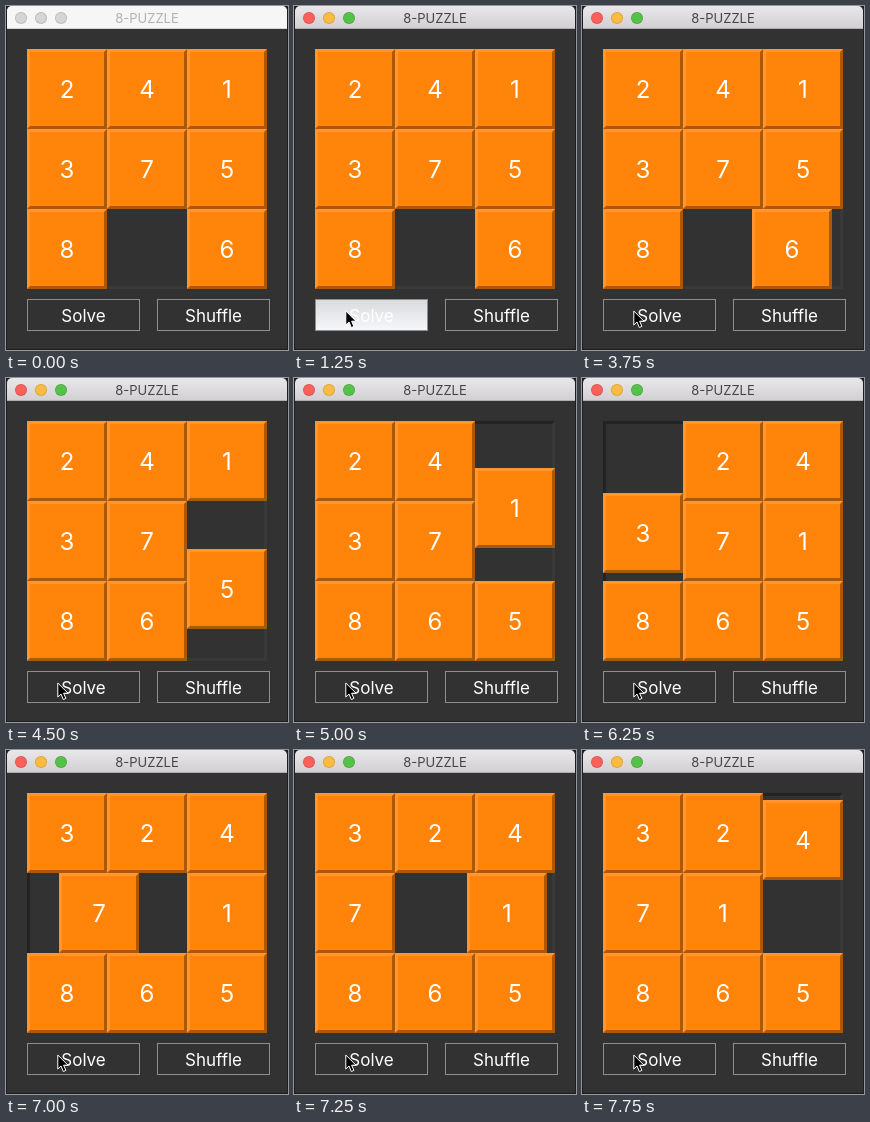
Write an HTML page that moves like this. It is 282 by 344 pixels and loops after 8000 ms.

```html
<!DOCTYPE html>
<html lang="en">
<head>
<meta charset="utf-8">
<title>8-PUZZLE</title>
<style>
  html, body { margin: 0; width: 100%; height: 100%; overflow: hidden; background: #1e1e1e; }
  body { font-family: Inter, "Liberation Sans", sans-serif; color: #fff; }
  div { position: absolute; box-sizing: border-box; }
  #stage { left: 0; top: 0; width: 282px; height: 344px; overflow: hidden; }
  #window { left: 1px; top: 0; width: 280px; height: 343px; background: #323232; border-radius: 5px 5px 0 0; overflow: hidden; }
  .bar { left: 0; top: 0; width: 280px; height: 23px; font-size: 13px; line-height: 25px; text-align: center; }
  .bar.active { background: linear-gradient(#e9e7e9, #d2d0d2); border-bottom: 1px solid #b0aeb0; color: #464446; }
  .bar.idle { background: #f6f6f6; border-bottom: 1px solid #d4d4d4; color: #b2b2b2; }
  .light { top: 6px; width: 12px; height: 12px; border-radius: 50%; border: 0.5px solid rgba(0, 0, 0, .12); }
  #board { left: 21px; top: 43px; width: 240px; height: 240px; }
  #frame { inset: 0; border: 3px solid; border-color: #232323 #393939 #393939 #232323; }
  .tile { width: 80px; height: 80px; background: #ff8409; border: 3px solid;
    border-color: #ff9630 #ab5807 #ab5807 #ff9630;
    font-size: 24px; line-height: 75px; text-align: center; }
  .button { top: 293px; width: 113px; height: 32px; border: 1px solid #8f8f91; font-size: 17px; line-height: 32px; text-align: center; }
  #pressed { inset: 0; background: linear-gradient(#dadbde, #f6f7fa); }
  .button span { position: relative; }
  #cursor { position: absolute; left: 0; top: 0; }
</style>
</head>
<body>
<div id="stage">
  <div id="window">
    <div class="bar active">8-PUZZLE</div>
    <div class="bar idle" id="idle">8-PUZZLE</div>
  </div>
  <div id="board"><div id="frame"></div></div>
  <div class="button" style="left:21px"><div id="pressed"></div><span>Solve</span></div>
  <div class="button" style="left:151px"><span>Shuffle</span></div>
  <svg id="cursor" width="13" height="20">
    <path d="M.8 1V15L4 12L6.3 17.5L8.9 16.4L6.6 11.2H11Z" fill="#000" stroke="#fff"/>
  </svg>
</div>
<script>
  const LOOP = 8000, TICK = 250, CELL = 80;
  const $ = id => document.getElementById(id);

  function add(parent, cls, text = '') {
    const el = document.createElement('div');
    el.className = cls;
    el.textContent = text;
    parent.append(el);
    return el;
  }

  // steps: [ms, value]; each value holds until the next one
  function play(el, prop, steps) {
    const last = steps[steps.length - 1][1];
    const keys = [...steps, [LOOP, last]].map(([ms, value]) =>
      ({ offset: ms / LOOP, [prop]: value, easing: 'step-end' }));
    el.animate(keys, { duration: LOOP, iterations: Infinity });
  }

  const at = (x, y) => `translate(${x}px, ${y}px)`;

  // Window buttons
  const paint = (bar, colors) => colors.forEach((color, i) => {
    const light = add(bar, 'light');
    light.style.left = 8 + 20 * i + 'px';
    light.style.background = color;
  });
  paint(document.querySelector('.active'), ['#fc605b', '#fdbc40', '#57c24a']);
  paint($('idle'), Array(3).fill('#d6d6d6'));

  // Tiles
  const tiles = {};
  [...'2413758 6'].forEach((n, i) => {
    if (n === ' ') return;
    const x = i % 3 * CELL, y = Math.floor(i / 3) * CELL;
    tiles[n] = { el: add($('board'), 'tile', n), x, y, steps: [[0, at(x, y)]] };
  });

  // tile, direction, distance covered at the first and second tick
  const moves = [
    [6, -1, 0, 11, 49], [5, 0, 1, 7, 48], [1, 0, 1, 7, 47],
    [4, 1, 0, 8, 47], [2, 1, 0, 7, 48], [3, 0, -1, 8, 49],
    [7, -1, 0, 8, 48], [1, -1, 0, 8, 48], [4, 0, 1, 7, 48]
  ];
  moves.forEach(([n, dx, dy, ...dist], i) => {
    const tile = tiles[n], start = 3750 + 2 * TICK * i;
    [...dist, CELL].forEach((d, k) => {
      const ms = start + k * TICK;
      if (ms < LOOP) tile.steps.push([ms, at(tile.x + dx * d, tile.y + dy * d)]);
    });
    tile.x += dx * CELL;
    tile.y += dy * CELL;
  });
  Object.values(tiles).forEach(tile => play(tile.el, 'transform', tile.steps));

  play($('idle'), 'opacity', [[0, 1], [1250, 0]]);
  play($('pressed'), 'opacity', [[0, 0], [1250, 1], [3750, 0]]);
  play($('cursor'), 'transform', [
    [0, at(-40, -40)], [250, at(110, 179)], [500, at(68, 262)], [750, at(51, 301)], [1000, at(51, 304)]
  ]);
</script>
</body>
</html>
```
